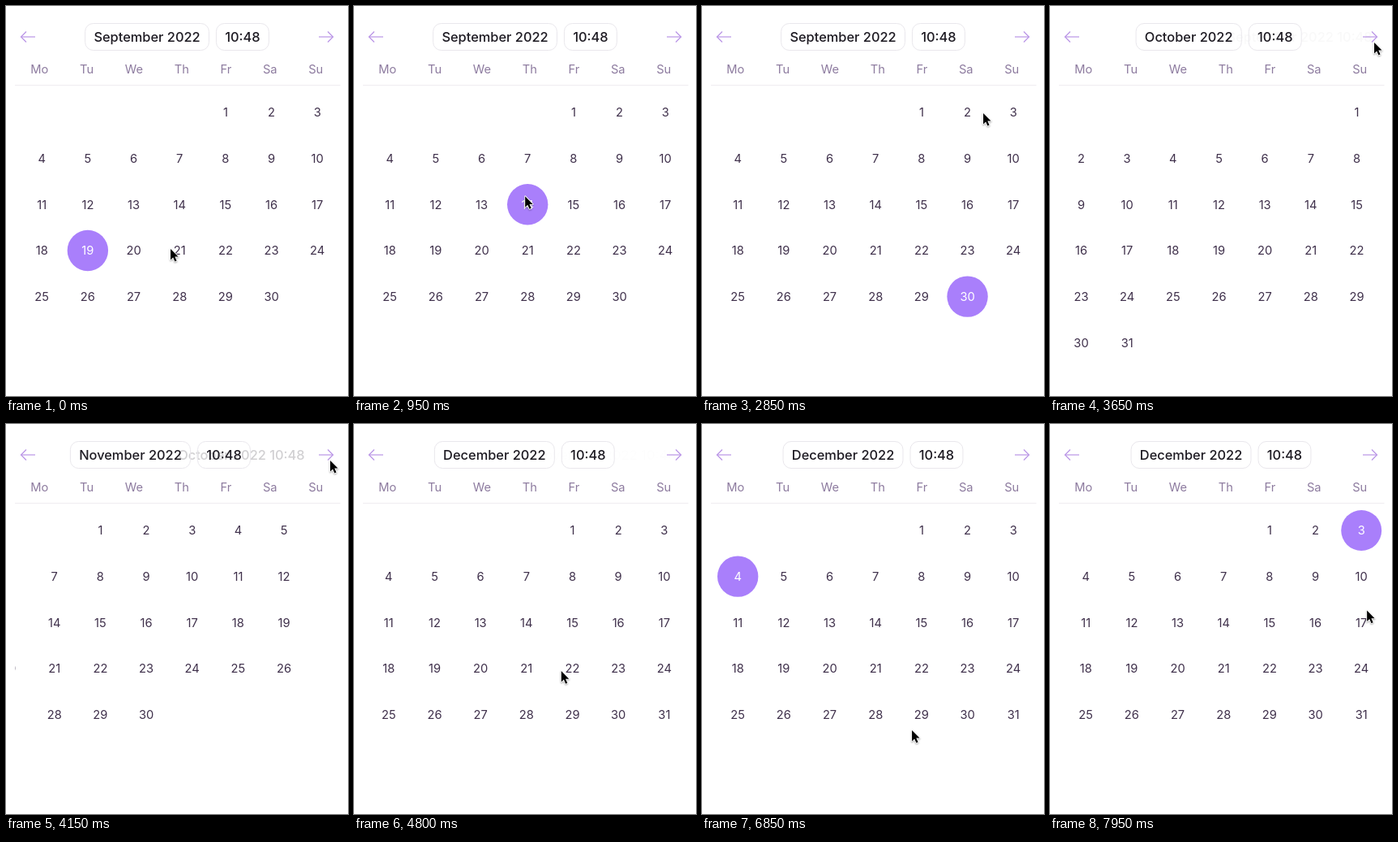
Recreate the animation shown at these times as an HTML page with a canvas. Size 422 by 480 pixels, loop 8 s.

```html
<!DOCTYPE html>
<html lang="en">
<head>
<meta charset="utf-8">
<title>Date picker</title>
<style>
  html, body { margin: 0; width: 100%; height: 100%; overflow: hidden; background: #fff; }
  canvas { display: block; width: 422px; height: 480px; }
</style>
</head>
<body>
<canvas></canvas>
<script>
const W = 422, H = 480, LOOP = 8000;
const REST = 150, SLIDE = 520, GROW = 165, SHRINK = 90;
const canvas = document.querySelector('canvas');
const ratio = window.devicePixelRatio || 1;
canvas.width = W * ratio;
canvas.height = H * ratio;
const ctx = canvas.getContext('2d');

const HEAD_FONT = '500 16.4px Inter, sans-serif';
const BODY_FONT = '400 14.7px Inter, sans-serif';
const INK = '#1d1a22', LILAC = '#b994e6', VIOLET = '#a97ffb';
const TIME = '10:48';
const CENTER = 211;
const WEEKDAYS = ['Mo', 'Tu', 'We', 'Th', 'Fr', 'Sa', 'Su'];

// Each month begins in the column after the last day of the one before.
const months = [['September', 30], ['October', 31], ['November', 30], ['December', 31]];
let column = 4;
const calendar = months.map(([name, days]) => {
  const month = { title: name + ' 2022', days, first: column };
  column = (column + days) % 7;
  return month;
});

// The pointer rests at each stop for REST ms, may click a day or 'next', then leaves.
const stops = [
  { leave: 50, x: 203, y: 298, click: 19 },
  { leave: 500, x: 203, y: 254 },
  { leave: 750, x: 203, y: 239, click: 14 },
  { leave: 1690, x: 278, y: 186, click: 8 },
  { leave: 2200, x: 278, y: 363, click: 29 },
  { leave: 2600, x: 322, y: 362, click: 30 },
  { leave: 2900, x: 347, y: 131 },
  { leave: 3290, x: 400, y: 44, click: 'next' },
  { leave: 3938, x: 400, y: 44, click: 'next' },
  { leave: 4380, x: 400, y: 44, click: 'next' },
  { leave: 5050, x: 248, y: 317 },
  { leave: 6000, x: 168, y: 250 },
  { leave: 6345, x: 42, y: 180, click: 4 },
  { leave: 6860, x: 259, y: 376, click: 29 },
  { leave: 7820, x: 378, y: 131, click: 3 },
  { leave: LOOP + REST, x: 393, y: 243 }
];

const clamp = v => Math.max(0, Math.min(1, v));
const easeOut = v => 1 - (1 - clamp(v)) ** 3;
const easeInOut = v => v ** 3 * (v * (v * 6 - 15) + 10);

// Replays the clicks made up to time t.
function stateAt(t) {
  const state = { index: 0, opened: -LOOP, day: 19, picked: -LOOP, released: 0 };
  for (const { leave, click } of stops) {
    if (!click || leave > t) continue;
    if (click === 'next') {
      state.index++;
      state.opened = leave;
      state.day = state.released = 0;
    } else if (click !== state.day) {
      state.released = state.day;
      state.day = click;
      state.picked = leave;
    }
  }
  return state;
}

function write(text, x, y, color, align = 'center') {
  ctx.fillStyle = color;
  ctx.textAlign = align;
  ctx.fillText(text, x, y);
}

function line(color, width, ...points) {
  ctx.strokeStyle = color;
  ctx.lineWidth = width;
  ctx.beginPath();
  points.forEach(([x, y]) => ctx.lineTo(x, y));
  ctx.stroke();
}

function drawArrow(tip, dir) {
  line(LILAC, 1.2, [tip, 38], [tip + dir * 17.5, 38]);
  line(LILAC, 1.2, [tip + dir * 6.5, 31.5], [tip, 38], [tip + dir * 6.5, 44.5]);
}

function drawPill(x, width, text) {
  ctx.strokeStyle = '#e9e7ec';
  ctx.lineWidth = 1;
  ctx.beginPath();
  ctx.roundRect(x + 0.5, 21.5, width - 1, 33, 10);
  ctx.stroke();
  write(text, x + width / 2, 44, INK);
}

function drawHeader(month, previous, p) {
  ctx.font = HEAD_FONT;
  if (previous && p < 1) {
    ctx.globalAlpha = 1 - p;
    write(previous.title + ' ' + TIME, CENTER + 100 * p, 44, INK);
  }
  ctx.globalAlpha = clamp(1.25 * p);
  const [titleWidth, timeWidth] = [month.title, TIME].map(text => ctx.measureText(text).width + 22.5);
  const left = CENTER - (titleWidth + 8 + timeWidth) / 2 - 100 * (1 - p);
  drawPill(left, titleWidth, month.title);
  drawPill(left + titleWidth + 8, timeWidth, TIME);
  ctx.globalAlpha = 1;
}

function drawWeekdays() {
  ctx.font = BODY_FONT;
  const widths = WEEKDAYS.map(name => ctx.measureText(name).width);
  const gap = (361 - widths.reduce((sum, w) => sum + w)) / 6;
  let x = 30.3;
  WEEKDAYS.forEach((name, i) => {
    write(name, x, 83.3, '#8d7b9f', 'left');
    x += widths[i] + gap;
  });
  line('#efedf1', 1, [11, 97.5], [412.5, 97.5]);
}

function drawGrid(month, p, t, { day: selected, released, picked }) {
  ctx.save();
  ctx.beginPath();
  ctx.rect(11, 98, 401.5, 382);
  ctx.clip();
  ctx.translate(-200 * (1 - p), 0);
  ctx.font = BODY_FONT;
  for (let day = 1; day <= month.days; day++) {
    const cell = day + month.first - 1;
    const x = 44.2 + 56.67 * (cell % 7);
    const y = 131 + 56.65 * Math.floor(cell / 7);
    const scale = day === selected ? easeOut((t - picked) / GROW)
      : day === released ? 1 - easeOut((t - picked) / SHRINK) : 0;
    ctx.fillStyle = VIOLET;
    ctx.beginPath();
    ctx.arc(x, y, 25.2 * scale, 0, 2 * Math.PI);
    ctx.fill();
    write(day, x, y + 5.3, day === selected ? '#fff' : '#3f304b');
  }
  ctx.restore();
}

function drawPointer(t) {
  const next = stops.findIndex(stop => stop.leave > t);
  const to = stops[next], from = stops[next - 1] || to;
  const k = easeInOut(clamp((t - from.leave) / (to.leave - REST - from.leave || 1)));
  const arrow = new Path2D('M.5 1V15.3L3.8 12.2L6.2 17.6L8.5 16.6L6.1 11.3H10.6Z');
  ctx.save();
  ctx.translate(from.x + (to.x - from.x) * k - 0.4, from.y + (to.y - from.y) * k);
  ctx.scale(0.94, 0.94);
  ctx.lineJoin = 'round';
  ctx.lineWidth = 1.8;
  ctx.strokeStyle = '#fff';
  ctx.shadowColor = 'rgba(0,0,0,.35)';
  ctx.shadowBlur = 2 * ratio;
  ctx.shadowOffsetY = ratio;
  ctx.stroke(arrow);
  ctx.shadowColor = 'transparent';
  ctx.fillStyle = '#000';
  ctx.fill(arrow);
  ctx.restore();
}

function draw(now) {
  const t = now % LOOP;
  const state = stateAt(t);
  const month = calendar[state.index];
  const p = easeOut((t - state.opened) / SLIDE);

  ctx.setTransform(ratio, 0, 0, ratio, 0, 0);
  ctx.fillStyle = '#fff';
  ctx.fillRect(0, 0, W, H);
  drawArrow(18.5, 1);
  drawArrow(403.5, -1);
  drawHeader(month, calendar[state.index - 1], p);
  drawWeekdays();
  drawGrid(month, p, t, state);
  drawPointer(t);
  requestAnimationFrame(draw);
}
requestAnimationFrame(draw);
</script>
</body>
</html>
```
